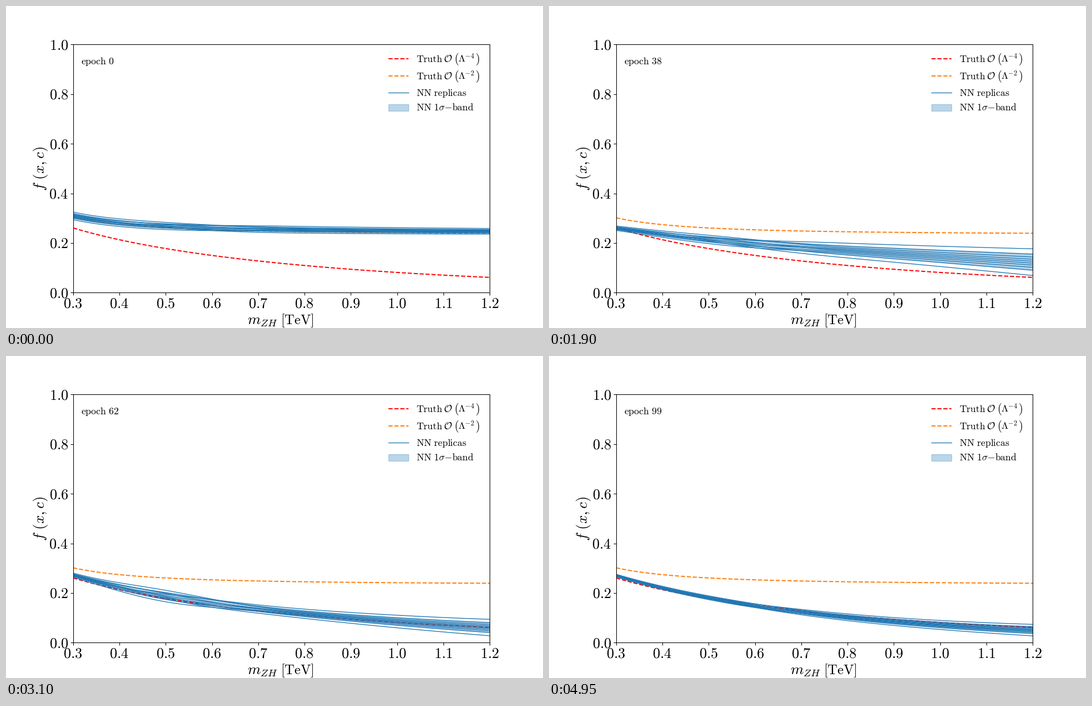
Recreate the animation shown at these times as a matplotlib script. Size 966 by 580 pixels, loop 5 s.

```python
import numpy as np
import matplotlib.pyplot as plt
from matplotlib.animation import FuncAnimation
from matplotlib.lines import Line2D
from matplotlib.patches import Rectangle

W, H, DPI = 966, 580, 100
FRAMES, INTERVAL = 100, 50
PT = 72 / DPI  # points per pixel
LEFT, RIGHT, TOP, BOTTOM = 120.9, 870.2, 69.45, 516.2  # axes box in pixels
BLUE, ORANGE, RED = "#1f77b4", "#ff7f0e", "#ff0000"
TICK, LABEL, SMALL = 26.3, 26.8, 17.6  # text sizes in pixels
DASHED, THIN, FRAME = 2.014, 1.343, 1.074  # line widths in pixels
REPLICAS = 10

plt.rcParams["mathtext.fontset"] = "cm"

x = np.linspace(0.3, 1.2, 120)
u = x - 0.3
r = u / 0.9

# Truth curves
s = u / 0.3
quartic = 1 / (3.82 + 2.44 * s + 0.27 * s**2 + 0.09 * s**3) - 0.0013
quadratic = 0.2337 + 0.0677 * (x / 0.3) ** -1.81

# Replicas start near one truth and settle near the other
start = quadratic + 0.008
final = 0.27 * np.exp(-2.05 * u + 0.2 * u**2)

# Each replica has one rank at the left edge and another at the right
rng = np.random.default_rng(7)
ranks = np.arctanh(np.linspace(-0.88, 0.88, REPLICAS))
z_left, z_right = rng.permutation(ranks), rng.permutation(ranks)
turn = np.pi / 2 * np.sin(np.pi / 2 * np.clip(u / 0.5, 0, 1)) ** 2
z = np.outer(z_left, np.cos(turn)) + np.outer(z_right, np.sin(turn))
z = (z - z.mean(axis=0)) / z.std(axis=0)


def bump(v, centre, width):
    return np.exp(-((v - centre) / width) ** 2)


def replicas(epoch):
    """Training progress: the mean descends while the spread swells and shrinks."""
    progress = 1 - np.exp(-(epoch / (38 + 4 * np.sin(np.pi * r))) ** 2.2)
    dip = 0.03 * bump(epoch, 32, 14) * np.exp(-u / 0.1)
    mean = start + (final - start) * progress - dip

    left = 0.008 - 0.005 * progress + 0.008 * bump(epoch, 16, 10)
    right = 0.006 + 0.007 * progress + 0.02 * bump(epoch, 40, 20)
    bulge = 0.01 * bump(epoch, 56, 12) * bump(x, 0.5, 0.15)
    spread = left + (right - left) * r**1.3 + bulge
    return mean + spread * z


fig = plt.figure(figsize=(W / 100, H / 100), dpi=DPI, facecolor="white")
ax = fig.add_axes([LEFT / W, 1 - BOTTOM / H,
                   (RIGHT - LEFT) / W, (BOTTOM - TOP) / H])
ax.set(xlim=(0.3, 1.2), ylim=(0, 1))
x_ticks = np.arange(3, 13) / 10
y_ticks = np.arange(0, 6) / 5
ax.set_xticks(x_ticks, [""] * len(x_ticks))
ax.set_yticks(y_ticks, [""] * len(y_ticks))
ax.tick_params(length=4.7 * PT, width=FRAME * PT)
for spine in ax.spines.values():
    spine.set_linewidth(FRAME * PT)


def text(px, py, s, size=SMALL, **kw):
    """Place math text with its baseline at a pixel position from the top left."""
    kw = {"ha": "left", "va": "baseline", **kw}
    return fig.text(px / W, 1 - py / H, f"${s}$", fontsize=size * PT, **kw)


def rm(s):
    return r"\mathrm{" + s.replace(" ", r"\ ") + "}"


# Axis labels
for v in x_ticks:
    px = LEFT + (RIGHT - LEFT) * (v - 0.3) / 0.9
    text(px - 0.5, 544, rm(f"{v:.1f}"), TICK, ha="center")
for v in y_ticks:
    py = BOTTOM + (TOP - BOTTOM) * v
    text(112, py + 9, rm(f"{v:.1f}"), TICK, ha="right")
text(434, 573.5, "m_{ZH}", LABEL)
text(494.5, 573.5, rm("[TeV]"), 24.6)
text(69, 293, r"f\ (x,c)", LABEL, ha="center", rotation=90,
     rotation_mode="anchor")

ax.plot(x, quartic, "--", color=RED, lw=DASHED * PT)
ax.plot(x, quadratic, "--", color=ORANGE, lw=DASHED * PT)
band, = ax.fill([0.3, 1.2, 1.2], [0, 0, 0], color=BLUE, alpha=0.3, lw=THIN * PT)
lines = [ax.plot([], [], color=BLUE, lw=THIN * PT)[0] for _ in range(REPLICAS)]


# Legend
def key_line(py, color, style, width):
    ends = np.array([688, 724]) / W
    fig.add_artist(Line2D(ends, [1 - py / H] * 2, color=color, ls=style,
                          lw=width * PT))


def truth_key(py, color, power):
    key_line(py, color, "--", DASHED)
    base = py + 6.4
    text(738, base, rm("Truth"))
    text(787, base, r"\mathcal{O}")
    text(806, base, "(", 21)
    text(813, base, rf"\Lambda^{{-{power}}}")
    text(843.5, base, ")", 21)


truth_key(95, RED, 4)
truth_key(126, ORANGE, 2)
key_line(156, BLUE, "-", THIN)
text(738, 162, rm("NN replicas"))
fig.add_artist(Rectangle((688 / W, 1 - 189 / H), 36 / W, 12 / H, color=BLUE,
                         alpha=0.3, lw=THIN * PT))
text(738, 188.5, rm("NN 1") + r"\sigma{-}" + rm("band"))

epoch_text = text(135, 105, rm("epoch 0"), 17.8)


def update(epoch):
    curves = replicas(epoch)
    for line, y in zip(lines, curves):
        line.set_data(x, y)
    mid, dev = curves.mean(axis=0), curves.std(axis=0)
    outline = np.concatenate([mid + dev, (mid - dev)[::-1]])
    band.set_xy(np.column_stack([np.concatenate([x, x[::-1]]), outline]))
    epoch_text.set_text(f"${rm(f'epoch {epoch}')}$")
    return [band, epoch_text, *lines]


anim = FuncAnimation(fig, update, frames=FRAMES, interval=INTERVAL,
                     repeat=True, repeat_delay=0, blit=False)
plt.show()
```
